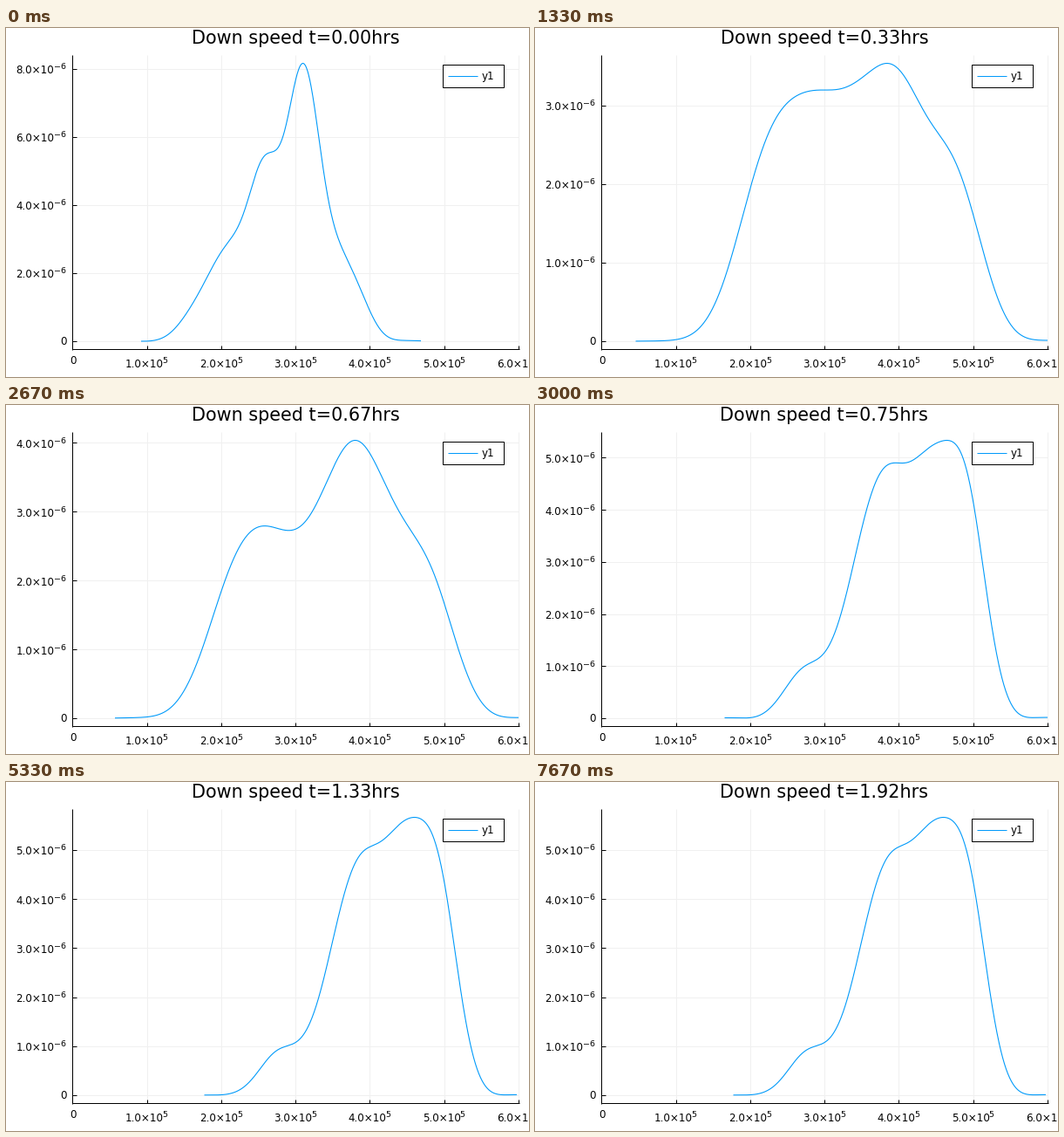
A matplotlib script that plays this animation: 600 by 400 pixels, repeating every 8000 ms.

```python
import numpy as np
import matplotlib.pyplot as plt
from matplotlib.animation import FuncAnimation

WIDTH, HEIGHT, DPI = 600, 400, 100
LOOP_MS, INTERVAL_MS, STEPS = 8000, 50, 24
LEAD_MS = 35  # lets a step show on the tick nearest before its time
PX = 72 / DPI  # points per pixel
LEFT, RIGHT, TOP, BOTTOM, BASE = 76.4, 588, 31, 368, 359
PEAK_RISE = 318.5  # height of every curve's peak above the base line
TICK_SIZE, SUPER_SIZE, TITLE_SIZE = 11.9, 9.5, 20.8
BLUE = "#009AFA"
X = np.arange(90, RIGHT + 0.25, 0.5)

plt.rcParams["font.family"] = "DejaVu Sans"


def density(peak, start, end, first, spacing, heights):
    """Sum of equal Gaussian kernels through evenly spaced key heights."""
    centres = first + spacing * np.arange(len(heights))

    def kernels(x):
        return np.exp(-0.5 * ((x[:, None] - centres) / (0.8 * spacing)) ** 2)

    weights = np.linalg.solve(kernels(centres), heights)
    rise = np.maximum(kernels(X) @ weights, 1e-6)
    return np.where((X >= start) & (X <= end), peak * rise / rise.max(), 0)


narrow = density(8.154, 155, 476, 165, 22, [
    0.3, 8.5, 35, 74, 111, 154, 213, 239, 318.5, 204, 108, 59, 14, 1.2])
broad = density(3.785, 115.5, RIGHT, 153, 30, [
    1, 11, 61, 160, 248, 297, 318.5, 295, 267, 250, 203, 168, 87, 17.5, 1.5])
double = density(3.955, 124, RIGHT, 166, 30, [
    2, 19, 81, 174, 221, 216, 216.5, 274, 318.5, 285, 237, 168, 65, 9, 0.8])
double_late = density(4.033, 125, RIGHT, 162, 30, [
    1.5, 15, 71, 160, 215, 217.5, 224, 280, 318.5, 275, 219, 163, 70, 11, 0.8])
skewed = density(5.334, 217.5, RIGHT, 235, 24, [
    0.3, 4, 28, 58, 74, 134, 234, 289.5, 293.3, 309.5, 318.5, 268, 112, 15, 0.7])
settled = density(5.664, 227.5, 586, 237, 24, [
    0.2, 3, 22, 50.5, 61.5, 107, 205, 276, 292.5, 314.3, 318.5, 256, 100, 12, 0.4])

schedule = ([narrow, (narrow + broad) / 2, broad] + [(broad + double) / 2] * 2
            + [double] * 3 + [double_late] + [skewed] * 4 + [settled] * 11)

fig = plt.figure(figsize=(WIDTH / DPI, HEIGHT / DPI), dpi=DPI, facecolor="white")
ax = fig.add_axes([0, 0, 1, 1])


def line(x, y, color="black", width=1.0, **kw):
    ax.plot(x, y, color=color, lw=width * PX, solid_capstyle="butt", **kw)


def label(x, y, text, size=TICK_SIZE, align="left"):
    ax.text(x, y, text, fontsize=size * PX, ha=align, va="baseline")


def power_label(x, y, value, exponent, gap):
    label(x, y, f"{value:.1f}×10")
    label(x + gap, y - 5, exponent, SUPER_SIZE)


def draw_axes(peak, unit):
    step = 2 if peak > 6 else 1
    values = range(0, int(peak * 1.03) + 1, step)
    x_ticks = np.linspace(LEFT, RIGHT, 7)
    y_ticks = [BASE - v * unit for v in values]
    for x in x_ticks:
        line([x, x], [TOP, BOTTOM], "0.94")
    for y in y_ticks:
        line([LEFT, RIGHT], [y, y], "0.94")

    line([LEFT, RIGHT + 0.5], [BOTTOM, BOTTOM])
    line([LEFT, LEFT], [TOP, BOTTOM + 0.5])
    for i, x in enumerate(x_ticks):
        line([x, x], [BOTTOM - 4.5, BOTTOM])
        if i:
            power_label(x - 24.7, 389, i, "5", 42.7)
    for v, y in zip(values, y_ticks):
        line([LEFT, LEFT + 5], [y, y])
        if v:
            power_label(LEFT - 65.2, y + 5.5, v, "−6", 43.5)
    label(LEFT + 0.3, 384.7, "0", align="center")
    label(LEFT - 7, BASE + 4, "0", align="right")


def draw_legend():
    ax.add_patch(plt.Rectangle((501, 42), 70, 26, fc="white", ec="black",
                               lw=PX, zorder=2.5))
    line([507, 541], [55, 55], BLUE, zorder=2.6)
    label(546, 59.2, "y1")


def draw(frame):
    step = int((frame * INTERVAL_MS + LEAD_MS) * STEPS / LOOP_MS) % STEPS
    curve = schedule[step]
    unit = PEAK_RISE / curve.max()

    ax.cla()
    ax.axis("off")
    ax.set_xlim(0, WIDTH)
    ax.set_ylim(HEIGHT, 0)
    draw_axes(curve.max(), unit)
    shown = curve > 0
    line(X[shown], BASE - curve[shown] * unit, BLUE, 1.1)
    draw_legend()
    label(331.9, 18.4, f"Down speed t={step / 12:.2f}hrs", TITLE_SIZE, "center")
    return []


anim = FuncAnimation(fig, draw, frames=LOOP_MS // INTERVAL_MS,
                     interval=INTERVAL_MS, init_func=lambda: [],
                     repeat=True, repeat_delay=0)
plt.show()
```
